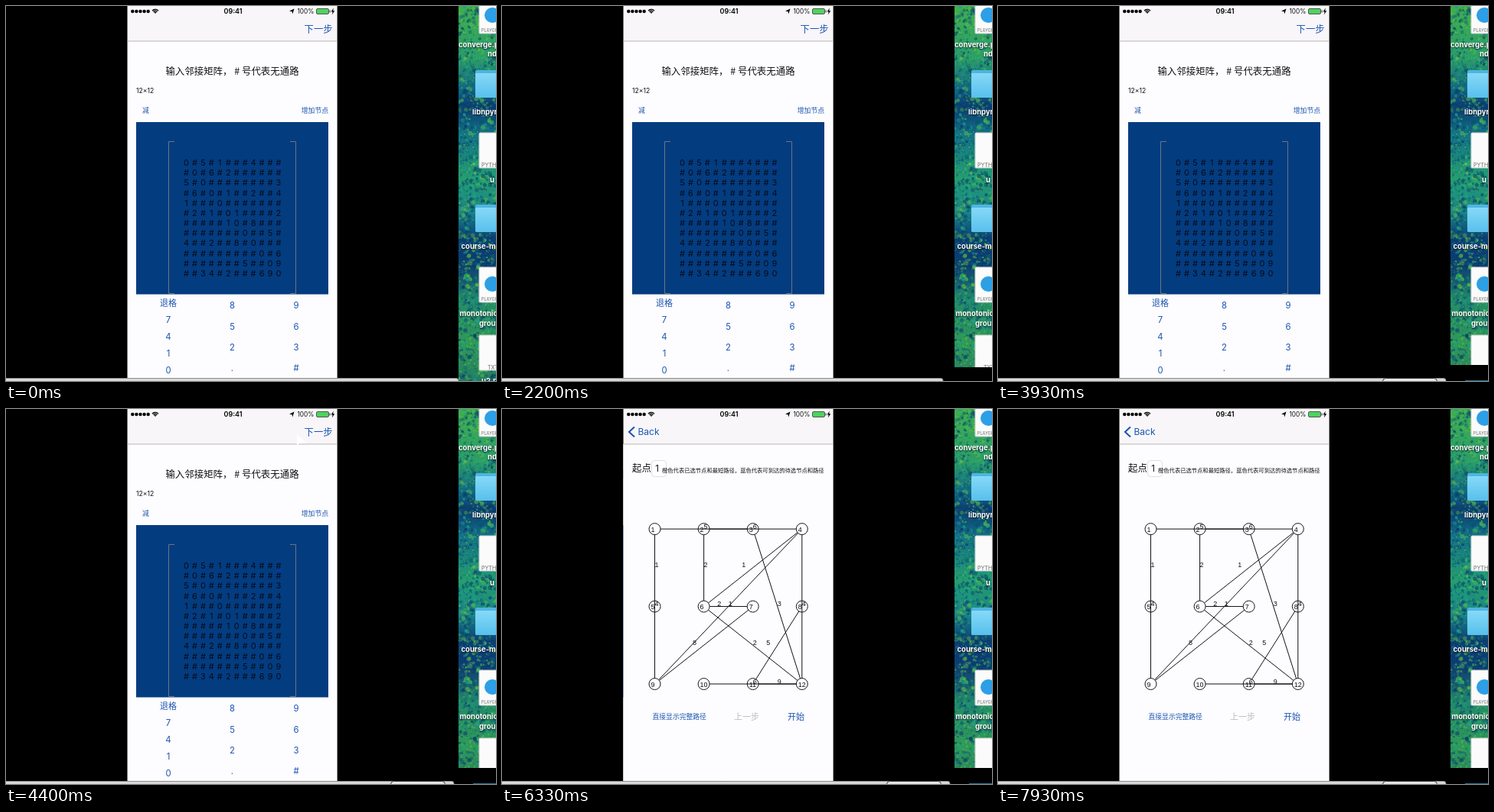
These frames come from a looping animation (640x491 px, 8000 ms). An HTML page with a canvas:

```html
<!DOCTYPE html>
<html lang="zh">
<head>
<meta charset="utf-8">
<style>
  html, body { margin: 0; width: 100%; height: 100%; overflow: hidden; background: #000; }
  canvas { display: block; width: 640px; height: 491px; }
</style>
</head>
<body>
<canvas id="stage" width="640" height="491"></canvas>
<script>
const LOOP = 8000;
const BLUE = '#1b55b0';
const SANS = '"Inter", "Noto Sans CJK SC", "Noto Sans CJK", sans-serif';
const CJK = '"Noto Sans CJK SC", "Noto Sans CJK", sans-serif';
const PLAIN = '"Liberation Sans", sans-serif';
const MATRIX = [
  '0#5#1###4###', '#0#6#2######', '5#0########3', '#6#0#1##2##4',
  '1###0#######', '#2#1#01####2', '#####10#8###', '#######0##5#',
  '4##2##8#0###', '#########0#6', '#######5##09', '##34#2###690'
];
const PHONE = { x: 158.3, w: 274.5, h: 487, nav: 46 };

const stage = document.getElementById('stage');
let g = stage.getContext('2d');

const clamp = v => Math.max(0, Math.min(1, v));
const progress = (t, from, to) => clamp((t - from) / (to - from));
const easeOut = p => 1 - (1 - p) ** 3;
const lerp = (a, b, p) => a + (b - a) * p;

function rect(x, y, w, h, color) {
  g.fillStyle = color;
  g.fillRect(x, y, w, h);
}

function path(points, { fill, stroke, width = 1 }) {
  g.beginPath();
  points.forEach(([x, y]) => g.lineTo(x, y));
  if (fill) { g.fillStyle = fill; g.fill(); }
  if (stroke) { g.strokeStyle = stroke; g.lineWidth = width; g.stroke(); }
}

function disc(x, y, r, fill, stroke) {
  g.beginPath();
  g.arc(x, y, r, 0, 7);
  if (fill) { g.fillStyle = fill; g.fill(); }
  if (stroke) { g.strokeStyle = stroke; g.lineWidth = 1; g.stroke(); }
}

function roundBox(x, y, w, h, r, { fill, stroke }) {
  g.beginPath();
  g.roundRect(x, y, w, h, r);
  if (fill) { g.fillStyle = fill; g.fill(); }
  if (stroke) { g.strokeStyle = stroke; g.lineWidth = 1; g.stroke(); }
}

// y is the optical middle of the line
function text(s, x, y, size, color, { align = 'left', font = CJK, weight = 400 } = {}) {
  g.font = `${weight} ${size}px ${font}`;
  g.textAlign = align;
  g.fillStyle = color;
  g.fillText(s, x, y + size * 0.37);
}

function seeded(seed) {
  return () => (seed = (seed * 16807) % 2147483647) / 2147483647;
}

function verticalGradient(y, h, stops) {
  const gradient = g.createLinearGradient(0, y, 0, y + h);
  stops.forEach(([p, color]) => gradient.addColorStop(p, color));
  return gradient;
}

// ---- desktop ----

function wallpaper() {
  const rand = seeded(77);
  rect(591, 0, 49, 491, verticalGradient(0, 491, [
    [0, '#3fb04f'], [0.14, '#2a9e68'], [0.22, '#126884'], [0.27, '#0b3a70'], [0.34, '#127288'],
    [0.46, '#239f70'], [0.55, '#188388'], [0.62, '#0c3f74'], [0.69, '#0c3c72'],
    [0.78, '#218a6c'], [0.9, '#2f9a57'], [1, '#237c62']]));
  const tones = ['#0b3568', '#0c4a70', '#0d5f74', '#4cbb50', '#1aa08c', '#6cc244'];
  for (let i = 0; i < 2600; i++) {
    g.globalAlpha = 0.3 + rand() * 0.45;
    const x = 591 + rand() * 49, y = rand() * 491;
    disc(x, y, 0.5 + rand() ** 3 * 2.4, tones[Math.floor(rand() * tones.length)]);
  }
  g.globalAlpha = 1;
}

function documentIcon(y, label, marked) {
  roundBox(618, y, 34, 46, 1, { fill: '#fbfbfb', stroke: '#c9d0d0' });
  if (marked) disc(635, y + 22, 10, '#2d9fe6');
  text(label, label === 'TXT' ? 629 : 621, y + 42, marked ? 5.5 : 7, '#686868', { font: SANS });
}

function folderIcon(y) {
  roundBox(613, y, 40, 36, 2, { fill: '#4fb4e0' });
  roundBox(613, y + 4, 40, 32, 2, { fill: verticalGradient(y, 36, [[0, '#8bdcfa'], [1, '#58c0ec']]) });
}

function desktopLabel(s, x, y) {
  g.shadowColor = '#000c';
  g.shadowBlur = 2;
  g.shadowOffsetY = 1;
  text(s, x, y, 9.5, '#fff', { font: SANS, weight: 700 });
  g.shadowColor = 'transparent';
  g.shadowOffsetY = 0;
}

function paintDesktop() {
  wallpaper();
  documentIcon(-10, 'PLAYGRO', true);
  desktopLabel('converge.pl', 591, 50);
  desktopLabel('nd', 629, 62);
  folderIcon(84);
  desktopLabel('libnpyra', 609, 138);
  documentIcon(166, 'PYTHON');
  desktopLabel('u', 632, 227);
  folderIcon(260);
  desktopLabel('course-ma', 594.5, 314);
  documentIcon(342, 'PLAYGRO', true);
  desktopLabel('monotonic', 592.5, 402);
  desktopLabel('grou', 618, 415);
  documentIcon(431, 'TXT');
  desktopLabel('u2.py', 621, 490);
}

const desktop = document.createElement('canvas');
desktop.width = 640;
desktop.height = 491;
const stageContext = g;
g = desktop.getContext('2d');
paintDesktop();
g = stageContext;

function drawSurroundings(t) {
  rect(0, 0, 640, 491, '#000');
  const first = progress(t, 400, 870), second = progress(t, 1900, 2500);
  const bottom = lerp(lerp(491, 476, first), 470, second);
  const stripEnd = lerp(lerp(591, 567, first), 585, second);
  g.save();
  g.beginPath();
  g.rect(591, 0, 49, Math.round(bottom));
  g.clip();
  g.drawImage(desktop, 0, 0);
  g.restore();
  roundBox(-4, 487.5, stripEnd + 4, 8, 3, { fill: '#d9d9d9', stroke: '#8f8f8f' });
  if (second === 1) {
    roundBox(502.5, 487.5, 71, 10, 4, { fill: '#e6e6e6', stroke: '#3c3c3c' });
    rect(610, 490, 30, 1, '#1a6f9c');
  }
}

// ---- phone ----

function statusBar() {
  for (let i = 0; i < 5; i++) disc(165.3 + i * 5.1, 7, 2.2, '#000');
  [1.2, 3.3, 5.5].forEach((r, i) => {
    g.beginPath();
    g.arc(195, 10, r, -Math.PI * 0.76, -Math.PI * 0.24);
    g.strokeStyle = '#000';
    g.lineWidth = i ? 1.3 : 2;
    g.stroke();
  });
  text('09:41', 296.5, 7, 9, '#000', { align: 'center', font: SANS, weight: 600 });
  path([[376.5, 3.5], [374.3, 10.5], [373.5, 7.3], [370, 6.7]], { fill: '#000' });
  text('100%', 380.5, 7, 8.3, '#111', { font: SANS });
  roundBox(405.5, 3.5, 16, 7, 1.5, { fill: '#4cd45f', stroke: '#555' });
  rect(422.5, 5.5, 1.2, 3, '#555');
  path([[428, 2.5], [424.5, 7.5], [426.7, 7.5], [425.7, 11.5], [429.3, 6.2], [427, 6.2]], { fill: '#000' });
}

function matrixScreen(t) {
  rect(PHONE.x, PHONE.nav, PHONE.w, PHONE.h - PHONE.nav, '#fdfcfe');
  text('输入邻接矩阵， # 号代表无通路', 295.5, 85, 12.45, '#111', { align: 'center' });
  text('12×12', 170, 110.5, 8.6, '#111', { font: SANS });
  text('减', 178, 136.5, 8.8, BLUE);
  text('增加节点', 421, 136.5, 8.8, BLUE, { align: 'right' });

  rect(170, 152, 251, 225.5, '#043c80');
  const bracket = { stroke: '#6c7480' };
  path([[220, 177.5], [212.5, 177.5], [212.5, 376.5], [220, 376.5]], bracket);
  path([[371, 177.5], [378.5, 177.5], [378.5, 376.5], [371, 376.5]], bracket);
  MATRIX.forEach((row, r) => [...row].forEach((cell, c) =>
    text(cell, 235.5 + c * 10.95, 205 + r * 13.17, 11, '#050b18', { align: 'center', font: SANS })));
  rect(352, 211, 9, 1.2, t % 1000 < 700 ? '#1236c0' : '#0b349c');

  text('退格', 212, 389, 11, BLUE, { align: 'center' });
  const keys = (labels, x, top, gap) => [...labels].forEach((key, i) =>
    text(key, x, top + i * gap, 11.3, BLUE, { align: 'center', font: SANS }));
  keys('7410', 212, 411, 21.8);
  keys('852.', 295.5, 392, 27.4);
  keys('963#', 379, 392, 27.4);
}

const nodeAt = i => ({ x: 199.5 + (i % 4) * 64.1, y: 157.1 + Math.floor(i / 4) * 101.45 });

function edges() {
  const list = [];
  MATRIX.forEach((row, i) => {
    for (let j = i + 1; j < row.length; j++)
      if (row[j] !== '#') list.push({ a: nodeAt(i), b: nodeAt(j), weight: row[j] });
  });
  return list;
}

// One stroke for all edges, so that overlapping ones do not darken
function drawEdges(list) {
  g.beginPath();
  for (const { a, b } of list) {
    const dx = b.x - a.x, dy = b.y - a.y, k = 7.5 / Math.hypot(dx, dy);
    g.moveTo(a.x + dx * k, a.y + dy * k);
    g.lineTo(b.x - dx * k, b.y - dy * k);
  }
  g.strokeStyle = '#111';
  g.lineWidth = 1;
  g.stroke();
  for (const { a, b, weight } of list) {
    const shift = b.x < a.x ? -14.5 : 0;
    text(weight, (a.x + b.x) / 2 + shift, (a.y + b.y) / 2 - 3.8, 9, '#111', { font: PLAIN });
  }
}

function graphScreen() {
  rect(PHONE.x, PHONE.nav, PHONE.w, PHONE.h - PHONE.nav, '#fdfcfe');
  text('起点', 170, 77.5, 12.4, '#111');
  roundBox(195.5, 67.5, 19, 21, 3.5, { fill: '#fff', stroke: '#dedde0' });
  text('1', 202.5, 77.5, 11.5, '#111', { align: 'center', font: SANS });
  text('橙色代表已选节点和最短路径，蓝色代表可到达的待选节点和路径', 209, 80.5, 7.3, '#111');

  drawEdges(edges());
  MATRIX.forEach((_, i) => {
    const { x, y } = nodeAt(i);
    disc(x, y, 7.5, null, '#161616');
    text(i + 1, x - 5, y + 0.3, 9, '#111', { font: PLAIN });
  });

  text('直接显示完整路径', 196.5, 402.5, 8.8, BLUE);
  text('上一步', 303, 402.5, 11, '#bcbbbe');
  text('开始', 373, 402.5, 11, BLUE);
}

function shifted(dx, draw) {
  g.save();
  g.translate(dx, 0);
  draw();
  g.restore();
}

function navigationBar(t, push) {
  rect(PHONE.x, 0, PHONE.w, PHONE.nav, '#f8f6f9');
  rect(PHONE.x, PHONE.nav - 0.5, PHONE.w, 1, '#b9b7ba');
  const pressed = t > 5560 ? 0.2 : 1;
  g.globalAlpha = pressed * (1 - push);
  text('下一步', 426.5, 30, 12.3, BLUE, { align: 'right' });
  g.globalAlpha = push;
  shifted((1 - push) * 80, () => {
    path([[173, 23.5], [166, 30], [173, 36.5]], { stroke: BLUE, width: 2 });
    text('Back', 177.5, 30, 12, BLUE, { font: SANS });
  });
  g.globalAlpha = 1;
  statusBar();
}

function pointer(t) {
  const visible = (t > 4200 && t < 5300) || (t > 6900 && t < 7800);
  if (visible) path([[380, 33], [380, 48], [383.5, 45], [392, 45]], { fill: '#fff' });
}

function drawPhone(t) {
  const push = easeOut(progress(t, 5850, 6350));
  g.save();
  g.beginPath();
  g.rect(PHONE.x, 0, PHONE.w, PHONE.h);
  g.clip();
  if (push < 1) {
    shifted(-push * PHONE.w * 0.3, () => matrixScreen(t));
    rect(PHONE.x, PHONE.nav, PHONE.w, PHONE.h, `rgba(0,0,0,${push * 0.1})`);
  }
  if (push > 0) shifted((1 - push) * PHONE.w, graphScreen);
  navigationBar(t, push);
  pointer(t);
  g.restore();
}

function frame() {
  const t = performance.now() % LOOP;
  drawSurroundings(t);
  drawPhone(t);
  requestAnimationFrame(frame);
}
frame();
</script>
</body>
</html>
```
